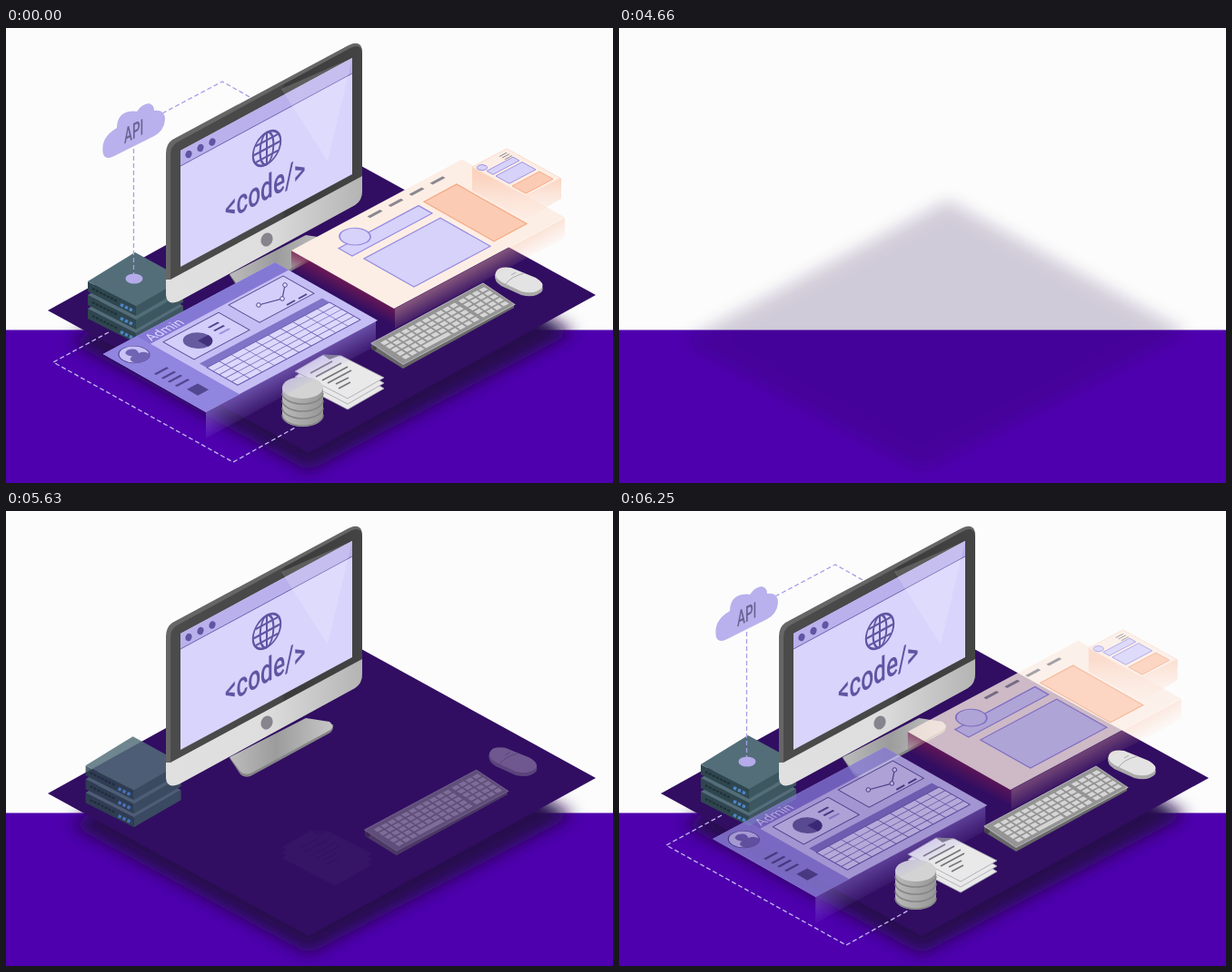
Animation of 668 by 501 pixels, one loop 6.32 s. Source, as an HTML page:

```html
<!DOCTYPE html>
<html lang="en">
<head>
<meta charset="utf-8">
<title>Isometric workspace</title>
<style>
  html, body { margin: 0; width: 100%; height: 100%; overflow: hidden; background: #fcfcfc; }
  svg { display: block; width: 100vw; height: 100vh; }
  text { font-family: Roboto, "Liberation Sans", sans-serif; }
  .dash { fill: none; stroke: #a79de9; stroke-width: 1.3; stroke-dasharray: 5 3; }
  .ink { stroke: #51478f; stroke-width: 2; fill: none; }
  .card { fill: #d3cefa; stroke: #51478f; stroke-width: .9; }
  .lilac { fill: #d6d2fa; stroke: #978ce0; stroke-width: 1.3; }
  .peach { fill: #fccbb3; stroke: #f4a781; stroke-width: 1.2; }
  .grey { stroke: #8b878f; fill: none; }
</style>
</head>
<body>
<svg viewBox="0 0 668 501" preserveAspectRatio="none">
  <defs>
    <filter id="soft" x="-20%" y="-20%" width="140%" height="140%"><feGaussianBlur stdDeviation="9"/></filter>
    <clipPath id="window"><path d="M0 16H668V501H0Z"/></clipPath>
    <linearGradient id="bezel"><stop offset="0" stop-color="#4b4b4b"/><stop offset=".58" stop-color="#474747"/><stop offset=".6" stop-color="#3b3b3b"/><stop offset="1" stop-color="#444"/></linearGradient>
    <linearGradient id="chin"><stop offset="0" stop-color="#e0e0e0"/><stop offset=".5" stop-color="#dedede"/><stop offset="1" stop-color="#b4b4b4"/></linearGradient>
    <linearGradient id="foot"><stop offset="0" stop-color="#bcbcbc"/><stop offset=".45" stop-color="#9c9c9c"/><stop offset="1" stop-color="#c6c6c6"/></linearGradient>
    <linearGradient id="metal"><stop offset="0" stop-color="#b9b9b9"/><stop offset="1" stop-color="#979797"/></linearGradient>
    <linearGradient id="fallLilac" gradientUnits="userSpaceOnUse" x1="313" y1="372" x2="328" y2="400"><stop offset="0" stop-color="#a592ee" stop-opacity=".5"/><stop offset="1" stop-color="#a592ee" stop-opacity="0"/></linearGradient>
    <linearGradient id="fallLeft" gradientUnits="userSpaceOnUse" x1="371" y1="277" x2="362" y2="294"><stop offset="0" stop-color="#7d1c50" stop-opacity=".75"/><stop offset="1" stop-color="#7d1c50" stop-opacity="0"/></linearGradient>
    <linearGradient id="fallRight" gradientUnits="userSpaceOnUse" x1="522" y1="258" x2="534" y2="280"><stop offset="0" stop-color="#fbbd9f" stop-opacity=".42"/><stop offset="1" stop-color="#fbbd9f" stop-opacity="0"/></linearGradient>
    <linearGradient id="fallBox" x1="0" y1="0" x2="0" y2="1"><stop offset=".2" stop-color="#fbd3bf"/><stop offset="1" stop-color="#fce5da" stop-opacity=".2"/></linearGradient>
  </defs>

  <path fill="#fcfcfc" d="M0 0H668V333H0Z"/>
  <path fill="#4e00ae" d="M0 332.5H668V501H0Z"/>

  <g id="scene" clip-path="url(#window)">
    <path id="shadow" filter="url(#soft)" fill="#260a4d" d="M362 190 625 335 333 488 70 345Z"/>
    <path id="platform" fill="#310e62" d="M362 136 649 294 333 468 46 311Z"/>
    <g id="lines">
      <path class="dash" d="M172 94 238 59 270 77"/>
      <path class="dash" style="stroke:#c3b9f3" d="M113 335 52 368 250 478 318 440"/>
    </g>
    <g id="server"></g>

    <g id="monitor">
      <path fill="#858585" d="M246 272 258 290Q262 294 269 292L357 244Q361 240 360 235Z"/>
      <path fill="url(#foot)" d="M246 271 258 287Q262 291 269 289L357 241Q362 237 356 232L330 228Z"/>
      <path fill="#666" d="M176 138Q176 128 183 123L377 19Q392 12 392 27V180Q392 190 384 195L190 301Q177 306 176 294Z"/>
      <path fill="url(#bezel)" d="M181 140Q181 130 188 126L379 22Q392 16 392 29V164L181 277Z"/>
      <path fill="url(#chin)" d="M176 277H181L392 163V179Q392 190 384 195L190 301Q177 306 176 294Z"/>
      <path fill="#d8d4fc" d="M192 135 381 33V161L192 263Z"/>
      <path fill="#bab1ec" d="M192 135 381 33V50L192 152Z"/>
      <path stroke="#6e63b0" d="M192 152 381 50"/>
      <path fill="#fff" opacity=".17" d="M303 67 354 147 381 33Z"/>
      <g fill="#5f55a2">
        <ellipse cx="201" cy="139" rx="3.4" ry="4.3" transform="rotate(20 201 139)"/>
        <ellipse cx="214" cy="132" rx="3.4" ry="4.3" transform="rotate(20 214 132)"/>
        <ellipse cx="227" cy="125.500" rx="3.4" ry="4.3" transform="rotate(20 227 125.500)"/>
        <text transform="matrix(.66 -.35 0 1 241 213)" font-size="37" font-weight="500">&lt;code/&gt;</text>
      </g>
      <g transform="matrix(.87 -.47 0 1 287 132.500)" fill="none" stroke="#5f55a2" stroke-width="2.3">
        <circle r="17.500"/><ellipse rx="8.500" ry="17.500"/>
        <path d="M0-17V17M-17 0H17M-14-9H14M-14 9H14"/>
      </g>
      <ellipse cx="287" cy="233" rx="6.3" ry="7.8" transform="rotate(25 287 233)" fill="#87848d"/>
    </g>

    <g id="cloud">
      <path fill="#b9b1ed" d="M107 139Q103 121 122 110Q122 95 135 92Q141 91 144 92Q149 84 157 83Q163 84 163 91Q175 89 175 101Q174 113 163 119L119 141Q110 146 107 139Z"/>
      <text transform="matrix(.56 -.29 0 1 130 127.500)" font-size="24" font-weight="500" fill="#656491">API</text>
    </g>
    <g id="link">
      <path class="dash" d="M140.500 133V273"/>
      <ellipse cx="141" cy="276" rx="9.500" ry="5.500" fill="#b5abea"/>
    </g>

    <g id="keyboard"></g>
    <g id="mouse">
      <path fill="#aaa" d="M538 272Q540 263 556 266L584 278Q593 284 590 290Q582 298 567 294L545 284Q537 279 538 272Z"/>
      <path fill="#e3e3e3" d="M539 269Q542 262 556 264L583 275Q593 281 590 286Q582 294 567 290L546 280Q537 275 539 269Z"/>
      <path fill="none" stroke="#aaa" d="M550 282Q555 274 570 270M556 272 561 269"/>
    </g>
    <g id="papers"></g>
    <g id="database"></g>

    <g id="wireframe">
      <path fill="url(#fallLeft)" d="M314 245 428 309V331L314 267Z"/>
      <path fill="url(#fallRight)" d="M428 309 615 209V231L428 331Z"/>
      <g transform="matrix(1 -.534 1 .566 314 245)">
        <path fill="#fdeee5" d="M0 0H188V113H0Z"/>
        <path class="grey" stroke-width="3" d="M77 8h14m9 0h14m9 0h14m9 0h14"/>
        <path class="peach" d="M124 22H160V99H124Z"/>
        <path class="lilac" d="M29 23H117V38H29ZM33 47H117V102H33Z"/>
        <circle class="lilac" cx="50" cy="20" r="12"/>
      </g>
      <path fill="url(#fallBox)" d="M513 153 572 186 611 165V188L572 211 513 179Z"/>
      <g transform="matrix(1 -.53 1 .55 513 153)">
        <path fill="#fdeee5" stroke="#fbd9c8" stroke-width=".7" d="M0 0H38V59H0Z"/>
        <path class="lilac" style="stroke-width:.7" d="M4 12H33V19H4ZM4 22H33V37H4Z"/>
        <path class="peach" style="stroke-width:.7" d="M3 41H33V56H3Z"/>
        <circle class="lilac" style="stroke-width:.7" cx="5" cy="6" r="4"/>
        <path class="grey" d="M26 4h8m-8 3h8m-8 3h8"/>
      </g>
    </g>

    <g id="dashboard">
      <path fill="url(#fallLilac)" d="M220 423 407 321V350L220 452Z"/>
      <g id="panel" transform="matrix(1 -.534 1 .566 107 359)"></g>
      <path class="ink" style="stroke-width:1.2" d="M278 305 304 298 307 283"/>
      <path class="ink" d="M309 305 318 300M322 298 331 293"/>
      <g fill="#e9e6ff" stroke="#51478f"><circle cx="278" cy="305" r="2.300"/><circle cx="304" cy="298" r="2.300"/><circle cx="307" cy="283" r="2.300"/></g>
    </g>
  </g>
</svg>
<script>
const $ = id => document.getElementById(id);
const range = n => [...Array(n).keys()];
const repeat = (n, draw) => range(n).map(draw).join('');

$('server').innerHTML = [30, 15, 0].map(y => `<g transform="translate(0 ${y})">
  <path fill="#2f464f" d="M90 279 143 306V317L90 290Z"/>
  <path fill="#3d5761" d="M143 306 195 276V287L143 317Z"/>
  <path fill="#536e79" d="M90 279 142 247 195 276 143 306Z"/>
  <path stroke="#1c3038" stroke-width="2" stroke-dasharray="3 1.500" d="M95 287 123 301"/>
  <path stroke="#4c86c9" stroke-width="3.500" stroke-dasharray="3.500 2" d="M126 304.500 141 312"/></g>`).join('');

const keys = repeat(5, row => repeat(15, col => {
  const x = 6 + col * 7.6 + (col > 10 ? 2 : 0), y = 4 + row * 5.8;
  return row === 4 && col > 2 && col < 7 ? (col === 3 ? `<path d="M${x} ${y}h28v4.200h-28Z"/>` : '')
    : `<path d="M${x} ${y}h5.800v4.200h-5.800Z"/>`;
}));
$('keyboard').innerHTML = `
  <path fill="#686868" d="M402 347 437 371 559 303V308L437 375 403 354Z"/>
  <circle cx="405" cy="352" r="3" fill="#444"/>
  <g transform="matrix(1 -.537 1 .67 402 347)">
    <path fill="#949494" stroke="#bdbdbd" stroke-width=".8" d="M0 0H123V35H0Z"/><g fill="#d5d5d5">${keys}</g></g>`;

$('papers').innerHTML = [12, 6, 0].map(y => `<path fill="#e9e9ea" stroke="#a6a4ac" stroke-width=".8"
  d="M318 ${378 + y} 349 ${360 + y / 2} 369 ${361 + y / 2} 416 ${385 + y} 376 ${408 + y}Z"/>`).join('') + `
  <path fill="#77757b" d="M349 360H369L356 365Z"/>
  <path stroke="#77757b" stroke-width="1.600" d="M335 380 359 367M341 384 369 369M348 388 376 373M354 391 380 377M363 392 377 385M366 397 379 390"/>`;

$('database').innerHTML = `
  <path fill="url(#metal)" d="M304 396V427A22.500 12 0 0 0 349 427V396Z"/>` + repeat(4, i => `
  <path fill="none" stroke="#868686" stroke-width="1.500" d="M304 ${402 + i * 8}A22.500 12 0 0 0 349 ${402 + i * 8}"/>`) + `
  <ellipse cx="326.500" cy="396" rx="22.500" ry="12" fill="#d3d3d3"/>`;

const grid = repeat(11, i => `M${45 + i * 13.500} 69V103`) + repeat(6, i => `M45 ${69 + i * 6.800}H180`);
$('panel').innerHTML = `
  <path fill="#c5bef4" d="M0 0H189V113H0Z"/>
  <path fill="#8478d5" d="M0 0H189V15H0Z"/>
  <path fill="#9085df" d="M0 0H37V113H0Z"/>
  <circle cx="17" cy="17" r="12" fill="#c9c3f6" stroke="#51478f" stroke-width=".8"/>
  <path fill="#7064b5" d="M9 26Q8 18 14 18Q10 10 18 9Q26 11 21 18Q28 19 26 25Q18 32 9 26Z"/>
  <text x="40" y="13" font-size="13" fill="#dcd7ff">Admin</text>
  <path class="card" d="M46 20H107V54H46ZM120 18H180V52H120Z"/>
  <circle cx="67" cy="37" r="11.500" fill="#665b9f"/>
  <path fill="#41317d" d="M67 37H78.500A11.500 11.500 0 0 1 67 48.500Z"/>
  <path class="ink" d="M86 30H97M86 36H97"/><path stroke="#9c91df" stroke-width="2" d="M86 42H97"/>
  <path fill="#8074c8" d="M45 61H180V69H45Z"/>
  <path fill="#dcd8fc" stroke="#6d61b4" stroke-width=".8" d="M45 69H180V103H45Z"/>
  <path stroke="#6d61b4" stroke-width=".8" d="${grid}"/>
  <path class="ink" style="stroke-width:2.500" d="M9 48H23M9 56H23M9 63H23M9 71H23"/>
  <path fill="#51478f" d="M12 80H24V92H12Z"/>`;

const LOOP = 6320;
// Start, end and number of held poses in each moving stretch.
const stretches = [[3720, 4320, 16], [4660, 4860, 6], [4860, 5290, 7], [5290, 5980, 11], [5980, 6040, 2], [6040, 6250, 4]];
function hold(t) {
  const stretch = stretches.filter(s => t >= s[0]).pop();
  if (!stretch) return 0;
  const [start, end, count] = stretch, step = (end - start) / (count - 1);
  return start + Math.min(count - 1, Math.floor((t - start) / step + 1e-4)) * step;
}

// Part: start, end, entry offset x and y, first visible time.
const entries = {
  shadow: [4620, 4820, 0, 0],
  platform: [4705, 5075, 0, 50, 4860],
  monitor: [5220, 5430, -57 * 2 / 4, -33 / 2 - .5, 5290],
  server: [5400, 5600, -14, 7],
  keyboard: [5470, 5670, -14, 8],
  mouse: [5500, 5690, -10, -5],
  papers: [5560, 5760, -14, -8],
  database: [5610, 5810, 0, -16],
  cloud: [5680, 5880, 0, -14],
  lines: [5930, 6160, 0, 0],
  link: [5930, 6160, 0, 0],
  wireframe: [6020, 6320, 16, -8.500],
  dashboard: [6020, 6320, -16, 8.500]
};

function render(time) {
  const t = hold(time % LOOP);
  const entering = t >= 4660;
  $('scene').setAttribute('opacity', t < 3720 || entering ? 1 : Math.max(0, 1 - (t - 3680) / 640));
  for (const [id, [start, end, dx, dy, first = start]] of Object.entries(entries)) {
    const p = !entering ? 1 : Math.max(0, Math.min(1, (t - start) / (end - start)));
    const part = $(id);
    part.setAttribute('opacity', entering && t < first ? 0 : p);
    part.setAttribute('transform', `translate(${dx * (1 - p)} ${dy * (1 - p)})`);
  }
}

const origin = performance.now();
function tick() {
  render(performance.now() - origin);
  requestAnimationFrame(tick);
}
tick();
</script>
</body>
</html>
```
